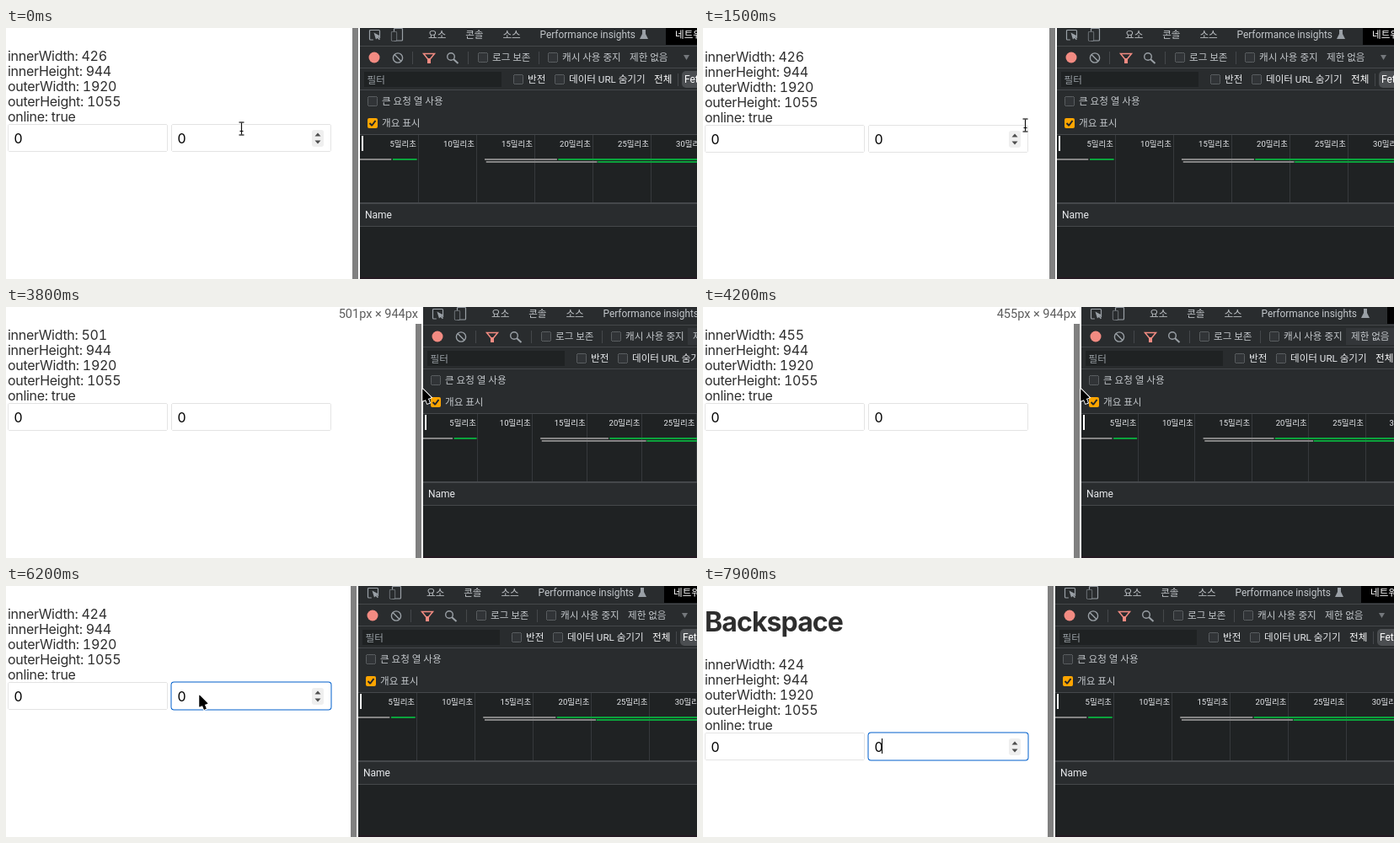
An HTML page with a canvas for the animation above (8 s loop, 820x298 px).

```html
<!DOCTYPE html>
<html lang="ko">
<head>
<meta charset="utf-8">
<style>
html, body { margin: 0; width: 100%; height: 100%; overflow: hidden; background: #fff; }
canvas, h1, pre { position: absolute; margin: 0; }
canvas { left: 0; top: 0; width: 820px; height: 298px; }
h1, pre { left: 2px; color: #2e2e2e; font-family: Inter, sans-serif; }
h1 { top: 23px; font-size: 32px; line-height: 40px; letter-spacing: -.9px; }
pre { font-size: 16px; line-height: 18px; letter-spacing: -.3px; font-variant-numeric: tabular-nums; }
</style>
</head>
<body>
<h1 id="key">Backspace</h1>
<pre id="info"></pre>
<canvas id="stage" width="820" height="298"></canvas>
<script>
const key = document.getElementById('key');
const info = document.getElementById('info');
const ctx = document.getElementById('stage').getContext('2d');
const LOOP = 8000, STEP = 100;
const TOOL_FONT = 'Roboto, "Noto Sans CJK KR", "Noto Sans CJK", sans-serif';
const GRAY = '#9aa0a6', LIGHT = '#c3c7cb', BRIGHT = '#e8eaed';
const BASE = '#292c2e', DEEP = '#1f2223', LINE = '#45484b';
const RED = '#f28b82', GREEN = '#0ba33c', BAR = '#858585';

const ramp = (t, from, to) => Math.min(1, Math.max(0, (t - from) / (to - from)));
const easeOut = k => 1 - (1 - k) ** 2;
const between = (t, from, to) => t >= from && t < to;

// Drag right, pause, then settle back just left of the start.
const dividerOffset = t =>
  Math.round(75 * ramp(t, 3100, 3500) - 77 * easeOut(ramp(t, 3800, 4900)));

function rect(x, y, w, h, color) {
  ctx.fillStyle = color;
  ctx.fillRect(x, y, w, h);
}

function paint(fill, stroke, width = 1.4) {
  if (stroke) { ctx.strokeStyle = stroke; ctx.lineWidth = width; ctx.stroke(); }
  if (fill) { ctx.fillStyle = fill; ctx.fill(); }
}

function round(x, y, w, h, r, fill, stroke, width) {
  ctx.beginPath();
  ctx.roundRect(x, y, w, h, r);
  paint(fill, stroke, width);
}

function circle(x, y, r, fill, stroke) {
  ctx.beginPath();
  ctx.arc(x, y, r, 0, Math.PI * 2);
  paint(fill, stroke);
}

function line(x, y, dx, dy, color, width = 1.4) {
  ctx.beginPath();
  ctx.moveTo(x, y);
  ctx.lineTo(x + dx, y + dy);
  paint(null, color, width);
}

// Isosceles triangle: tip at (x, y), base h below it (above when h < 0).
function triangle(x, y, w, h, fill, stroke, width) {
  ctx.beginPath();
  ctx.moveTo(x, y);
  ctx.lineTo(x - w / 2, y + h);
  ctx.lineTo(x + w / 2, y + h);
  ctx.closePath();
  paint(fill, stroke, width);
}

function placed(x, y, draw, angle = 0, scale = 1) {
  ctx.save();
  ctx.translate(x, y);
  ctx.rotate(angle);
  ctx.scale(scale, scale);
  draw();
  ctx.restore();
}

function label(str, x, y, color = LIGHT, size = 11.6, align = 'left') {
  ctx.font = `${size}px ${TOOL_FONT}`;
  ctx.fillStyle = color;
  ctx.textAlign = align;
  ctx.fillText(str, x, y);
}

function drawInput(x, y, focused) {
  if (focused) round(x + .5, y + .5, 189, 32, 3, '#fff', '#005fcc', 2);
  else round(x + .5, y + .5, 189, 32, 2.5, '#fff', '#c8c8c8', 1);
  ctx.font = '16px Inter, sans-serif';
  ctx.textAlign = 'left';
  ctx.fillStyle = '#000';
  ctx.fillText('0', x + 7.5, y + 23);
}

function drawPage(t, width, edge) {
  const typed = t >= 6500, focused = t >= 5700;
  const shift = (typed ? 60 : 0) + (between(t, 500, 2000) ? 1 : 0);
  const y = 114 + shift;
  key.hidden = !typed;
  info.style.top = 24 + shift + 'px';
  info.textContent = [
    `innerWidth: ${width}`, 'innerHeight: 944', 'outerWidth: 1920',
    'outerHeight: 1055', 'online: true'
  ].join('\n');

  drawInput(2, y, false);
  drawInput(196, y, focused);
  if (t < 1700 || focused) {
    round(363, y + 7, 14, 20, 3, '#efefef');
    triangle(370, y + 10.5, 7, 4, '#4d4d4d');
    triangle(370, y + 23.5, 7, -4, '#4d4d4d');
  }
  if (typed) rect(212, y + 7, 1, 18, '#000');

  rect(edge - 10, 0, 7, 298, '#808080');
  rect(edge - 3, 0, 2, 298, '#fff');
  if (between(t, 3200, 5400)) {
    rect(edge - 105, 0, 102, 20, '#fff');
    label(`${width}px × 944px`, edge - 7, 13, '#5c5c5c', 14.5, 'right');
  }
}

function checkbox(x, y, checked) {
  if (!checked) return round(x + .5, y + .5, 11, 11, 2, '#313437', '#85898d', 1);
  round(x, y, 12, 12, 2, '#ffa500');
  line(x + 2.5, y + 6, 3, 3, '#22262a', 2);
  line(x + 5, y + 9, 4.5, -6, '#22262a', 2);
}

function option(str, x, y, color, checked) {
  checkbox(x, y - 10, checked);
  label(str, x + 17, y, color);
}

// Pointer whose left edge is vertical and right edge is diagonal.
function drawArrow(fill, outline) {
  placed(0, 0, () => {
    for (const border of outline ? [outline, null] : [null]) {
      triangle(0, 0, 10.8, 13, fill, border, 2.2);
      round(-1.4, 11, 2.8, 7, 0, fill, border, 2.2);
    }
  }, -Math.PI / 8);
}

function drawTabs() {
  ctx.setLineDash([20, 9, 19]);
  round(10.5, 2.5, 12, 11.5, 1, null, GRAY, 1.2);
  ctx.setLineDash([]);
  placed(15.5, 5.5, () => drawArrow(GRAY), -.3, .6);
  round(39.5, .5, 10, 14.5, 1, null, GRAY, 1.2);
  round(36.5, 4.5, 6, 10.5, 1, BASE, GRAY, 1.2);
  ['요소', '콘솔', '소스'].forEach((name, i) => label(name, 80 + 44.2 * i, 12));
  label('Performance insights', 212.5, 12, LIGHT, 11.9);
  triangle(336, 3, 10, 10, GRAY);
  rect(334, 2, 4, 5, GRAY);
  rect(362, 0, 500, 20, '#000');
  label('네트워크', 373, 12, '#fff');
}

function drawToolbar(hover) {
  circle(16, 35, 6.5, RED);
  circle(44, 35.5, 5.6, null, GRAY);
  line(40, 31.5, 8, 8, GRAY);
  triangle(81, 38.5, 13, -8, null, RED, 1.5);
  rect(79, 36, 4, 6, RED);
  circle(107, 34, 4.3, null, GRAY);
  line(110, 37, 5.5, 5, GRAY, 2);
  [61, 127, 211].forEach(x => rect(x, 28, 1, 15, LINE));
  option('로그 보존', 139, 39);
  option('캐시 사용 중지', 222, 39);
  if (hover) rect(313, 25, 88, 20, '#333639');
  label('제한 없음', 319, 39);
  triangle(386.5, 38, 7, -6, '#74787c');
}

function drawFilters() {
  rect(4, 52, 163, 18, DEEP);
  label('필터', 7.5, 65.5, GRAY);
  option('반전', 181, 65, BRIGHT);
  option('데이터 URL 숨기기', 230, 65, BRIGHT);
  label('전체', 348, 65, '#fff');
  rect(376, 54, 1, 15, LINE);
  round(381, 51, 70, 20, 5, '#4b4e51');
  label('Fetch/XHR', 384, 65, '#fff', 12);
  option('큰 요청 열 사용', 8, 91);
  option('개요 표시', 8, 117, LIGHT, true);
}

function drawOverview(offset) {
  const unit = 69 - .055 * offset;
  const at = k => k * unit - 1;
  const bar = (from, to, y, color) => rect(at(from), y, at(to) - at(from), 2, color);
  rect(-1, 126, 820, 82, DEEP);
  for (let k = 1; k < 8; k++) {
    rect(Math.floor(at(k)), 127, 1, 81, '#36393c');
    label(`${k * 5}밀리초`, at(k) - 2, 141, BRIGHT, 9.5, 'right');
  }
  bar(0, .54, 155, BAR);
  bar(.565, .98, 155, GREEN);
  bar(2.145, 3.39, 155, BAR);
  bar(3.41, 8, 155, GREEN);
  bar(2.17, 4.08, 158, BAR);
  bar(4.09, 8, 158, GREEN);
  rect(1, 128, 2, 18, '#fff');
}

function drawTools(t, edge, offset) {
  placed(edge, 0, () => {
    rect(-1, 0, 820, 298, BASE);
    drawTabs();
    drawToolbar(between(t, 3800, 5600));
    drawFilters();
    drawOverview(offset);
    [21, 47, 73, 126, 207, 208, 235].forEach(y => rect(-1, y, 820, 1, LINE));
    label('Name', 5, 226, BRIGHT, 12);
    rect(-1, 236, 820, 62, DEEP);
    rect(-1, 296, 820, 2, '#241a22');
  });
}

function drawBeam() {
  for (const [color, width] of [['#fff', 2.5], ['#111', 1.2]]) {
    line(0, -7, 0, 14, color, width);
    line(-2, 3, 4, 0, color, width);
    for (const y of [-7.5, 7.5]) line(-3, y, 6, 0, color, width);
  }
}

function drawResize() {
  for (const border of ['#fff', null]) {
    for (const side of [-1, 1])
      placed(0, 0, () => triangle(0, -7, 9, 5, '#000', border, 2), side * Math.PI / 2);
    round(-3, -1, 6, 2, 0, '#000', border, 2);
  }
  rect(-.5, -5, 1, 10, '#fff');
}

function cursorAt(t, edge) {
  if (between(t, 3200, 4700)) return [edge - 2, 97];
  let [x, y] = [279, 119];
  const glide = (from, to, endX, endY) => {
    const k = ramp(t, from, to);
    x += (endX - x) * k;
    y += (endY - y) * k;
  };
  glide(0, 1500, 382, 115);
  glide(1500, 2200, 505, 180);
  glide(2500, 2900, edge - 1, 100);
  glide(5500, 5900, 229, 129);
  return [x, y];
}

function drawCursor(t, edge) {
  if (t >= 6500) return;
  const [x, y] = cursorAt(t, edge);
  const resizing = between(t, 2900, 3200) || between(t, 4700, 5600);
  const draw = t < 1700 ? drawBeam : resizing ? drawResize : () => drawArrow('#000', '#fff');
  placed(Math.round(x) + .5, Math.round(y) + .5, draw);
}

function frame(now) {
  const t = Math.floor((now % LOOP) / STEP) * STEP;
  const offset = dividerOffset(t);
  const edge = 421 + offset;
  ctx.clearRect(0, 0, 820, 298);
  drawPage(t, 426 + offset, edge);
  drawTools(t, edge, offset);
  drawCursor(t, edge);
  requestAnimationFrame(frame);
}
requestAnimationFrame(frame);
</script>
</body>
</html>
```
